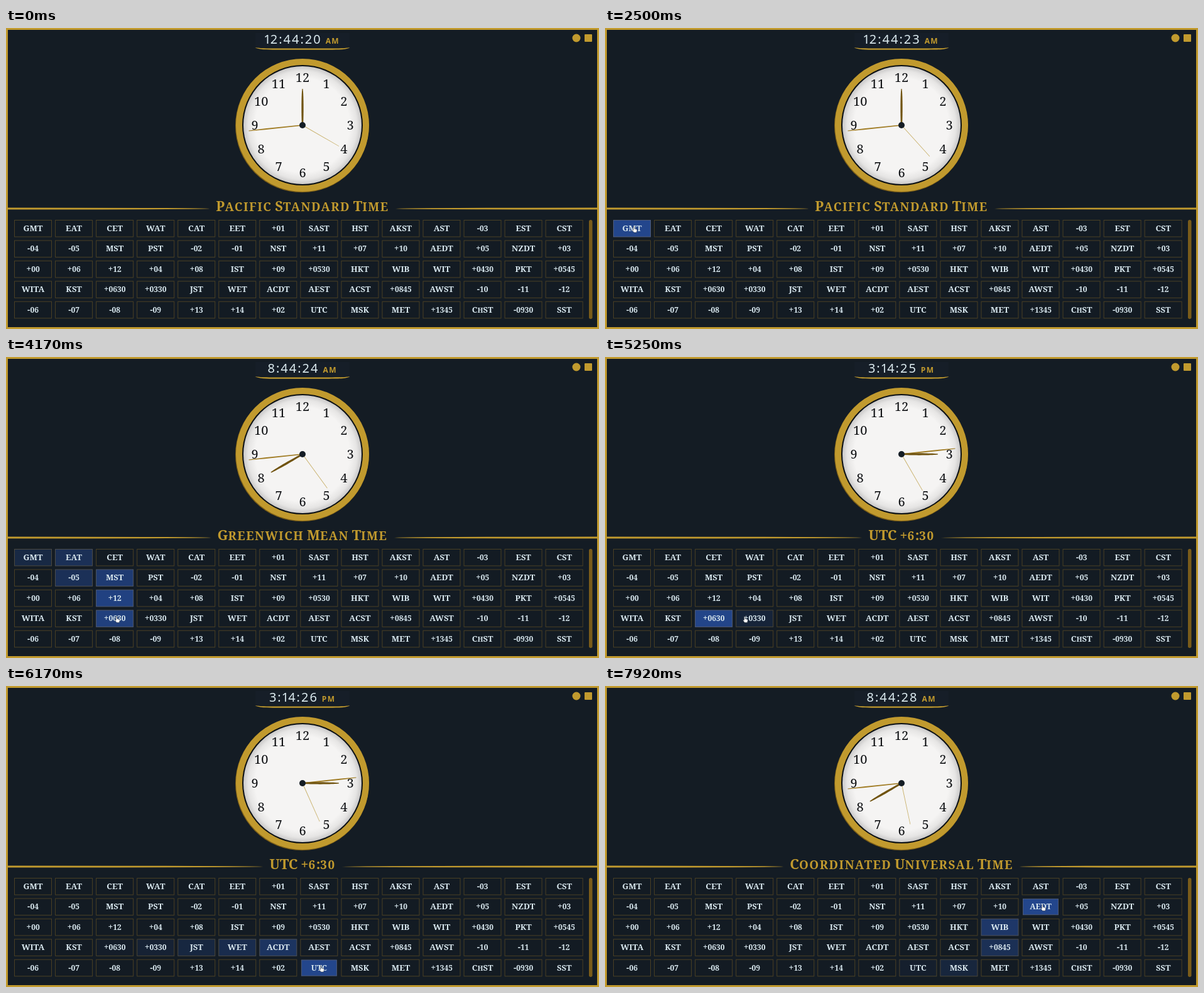
An HTML page that plays this animation: 944 by 480 pixels, repeating every 8 s.

```html
<!DOCTYPE html>
<html lang="en">
<head>
<meta charset="utf-8">
<title>World clock</title>
<style>
  html, body { margin: 0; width: 100%; height: 100%; overflow: hidden; background: #141c24; }
  svg { display: block; width: 100vw; height: 100vh; }
  text { text-anchor: middle; }
  .cells text { font: 700 13px "Noto Serif", serif; fill: #d9e8ef; }
  .cells text.num { font-size: 14px; }
  .dial text { font: 20px "Noto Serif", serif; fill: #0b0d10; }
  .title { font: 700 22px "Noto Serif", serif; fill: #c19a2e; word-spacing: -1px; }
  .title .small { letter-spacing: 1.5px; }
  .small { font-size: .86em; }
  .digital { font: 500 20px "Noto Sans", sans-serif; fill: #dcebf0; letter-spacing: 2px; }
  .digital .one { letter-spacing: -1px; }
  .digital .half { font-size: 12px; font-weight: 600; fill: #c19a2e; letter-spacing: 1.4px; }
</style>
</head>
<body>
<svg viewBox="0 0 944 480" xmlns="http://www.w3.org/2000/svg">
  <defs>
    <radialGradient id="face">
      <stop offset=".8" stop-color="#f5f4f3"/>
      <stop offset=".92" stop-color="#e6e5e4"/>
      <stop offset="1" stop-color="#c9c8c8"/>
    </radialGradient>
  </defs>
  <rect width="944" height="480" fill="#141c24"/>
  <rect x="397" y="8" width="150" height="23" fill="#161e28"/>
  <path fill="#c19a2e" d="M396.5 31C402 34.5 415 34.7 430 34.7H514C530 34.7 543 34.5 547.5 31C540 32.5 530 32.5 514 32.5H430C415 32.5 404 32.5 396.5 31Z"/>
  <text id="digital" class="digital" x="471.7" y="25"></text>
  <circle cx="908" cy="16" r="6.5" fill="#c19a2e"/>
  <rect x="921" y="10" width="12" height="12" rx="1" fill="#c19a2e"/>

  <g class="dial" transform="translate(472 155)">
    <circle cx="-.7" cy="1" r="106.3" fill="#7d5f18"/>
    <circle r="106" fill="#c19a2e"/>
    <circle r="96" fill="#0a0f14"/>
    <circle r="94" fill="url(#face)"/>
    <g id="hours"></g>
    <path id="second" d="M-.5 0L-.4-67H.4L.5 0Z" fill="#c8b06a"/>
    <path id="minute" d="M-.8 0L-1-60L-.4-86H.4L1-60L.8 0Z" fill="#a07c24"/>
    <path id="hour" d="M-1.1 0C-1.8-15-2-48-.5-58H.5C2-48 1.8-15 1.1 0Z" fill="#70530f"/>
    <circle r="5" fill="#141c24"/>
  </g>

  <path id="rule" fill="#c19a2e"/>
  <text id="title" class="title" x="472" y="292"></text>
  <g id="cells" class="cells"></g>
  <rect x="928" y="306" width="5.5" height="158" rx="2.7" fill="#7a5c1a"/>
  <rect x="1.5" y="1.5" width="941" height="477" fill="none" stroke="#c19a2e" stroke-width="3"/>
  <path id="cursor" fill="#fff" stroke="#1a222c" stroke-width=".6"/>
</svg>
<script>
const LOOP = 8000, FADE_IN = 100, FADE_OUT = 1000, PRESS = 120;
const COLS = 14, W = 60, H = 27.5;
const $ = id => document.getElementById(id);

const labels = `GMT EAT CET WAT CAT EET +01 SAST HST AKST AST -03 EST CST
-04 -05 MST PST -02 -01 NST +11 +07 +10 AEDT +05 NZDT +03
+00 +06 +12 +04 +08 IST +09 +0530 HKT WIB WIT +0430 PKT +0545
WITA KST +0630 +0330 JST WET ACDT AEST ACST +0845 AWST -10 -11 -12
-06 -07 -08 -09 +13 +14 +02 UTC MSK MET +1345 ChST -0930 SST`.split(/\s+/);

const cells = labels.map((label, i) => ({
  label, x: 13 + i % COLS * 65.05, y: 306 + Math.floor(i / COLS) * 32.45, spans: []
}));

// Zone chosen by each click, with its offset from UTC in hours
const zones = [
  { click: 0, name: 'Pacific Standard Time', offset: -8 },
  { click: 2900, name: 'Greenwich Mean Time', offset: 0 },
  { click: 4640, name: 'UTC +6:30', offset: 6.5 },
  { click: 6250, name: 'Coordinated Universal Time', offset: 0 }
];
const clicks = [...zones.map(z => z.click), LOOP];

// The pointer moves straight between these places.
const aim = label => {
  const c = cells.find(c => c.label === label);
  return { x: c.x + W / 2 + 3, y: c.y + H / 2 - 3 };
};
const route = [
  [500, { x: 946, y: 200 }], [1700, { x: 170, y: 290 }], [2100, { x: 50, y: 300 }],
  [2300, 'GMT'], [3400, 'GMT'], [3600, 'EAT'], [3700, '-05'], [3830, 'MST'], [4000, '+12'],
  [4120, '+0630'], [5180, '+0630'], [5280, '+0330'], [5640, 'ACDT'], [5900, 'UTC'],
  [6950, 'UTC'], [7100, 'MSK'], [7300, '+0845'], [7360, '+0845'], [7480, 'WIB'],
  [7520, 'WIB'], [7690, 'AEDT'], [LOOP, 'AEDT']
].map(([t, at]) => ({ t, ...(at.x ? at : aim(at)) }));

const HAND = 'M-1 0Q0-1 1 0V4L5 5Q6 5.5 6 7L5 11H0L-3 7Q-3 5.5-1 6.5Z';
const ARROW = 'M0 0V11L2.5 8.8L4.2 12.4L5.8 11.6L4.2 8.2H7.6Z';

const lerp = (a, b, k) => a + (b - a) * k;
const mix = (a, b, k) => `rgb(${a.map((v, i) => Math.round(lerp(v, b[i], k)))})`;

// Lower case becomes small capitals, figures take the same height.
const setType = s => s.replace(/[a-z0-9]+/g, c => `<tspan class="small">${c.toUpperCase()}</tspan>`);

function pointer(t) {
  const i = route.findIndex(p => p.t > t);
  if (i < 1) return null;
  const a = route[i - 1], b = route[i], k = (t - a.t) / (b.t - a.t);
  return { x: lerp(a.x, b.x, k), y: lerp(a.y, b.y, k) };
}

const hit = p => p && cells.find(c => p.x >= c.x && p.x <= c.x + W && p.y >= c.y && p.y <= c.y + H);

// Hover intervals follow from the route.
for (let t = 0, last; t < LOOP; t += 5) {
  const cell = hit(pointer(t));
  if (cell && cell !== last) cell.spans.push({ start: t, end: t });
  if (cell) cell.spans[cell.spans.length - 1].end = t + 5;
  last = cell;
}

function glow(cell, t) {
  return Math.max(0, ...cell.spans.filter(s => s.start <= t).map(s => {
    const peak = Math.min(1, (Math.min(t, s.end) - s.start) / FADE_IN);
    return peak * (1 - Math.max(0, t - s.end) / FADE_OUT);
  }));
}

$('cells').innerHTML = cells.map(c => `<g>
  <rect x="${c.x + .5}" y="${c.y + .5}" width="${W - 1}" height="${H - 1}"/>
  <text${/\d/.test(c.label) ? ' class="num"' : ''} x="${c.x + W / 2}" y="${c.y + 18}">${setType(c.label)}</text></g>`).join('');
[...$('cells').children].forEach((g, i) => {
  cells[i].group = g;
  cells[i].box = g.firstElementChild;
});

$('hours').innerHTML = Array.from({ length: 12 }, (_, i) => {
  const a = (i + 1) * Math.PI / 6;
  return `<text x="${76 * Math.sin(a)}" y="${7.2 - 76 * Math.cos(a)}">${i + 1}</text>`;
}).join('');

const turn = (id, deg) => $(id).setAttribute('transform', `rotate(${deg})`);
const shown = {};
function put(id, html) {
  if (shown[id] !== html) $(id).innerHTML = shown[id] = html;
}

function drawTime(t, offset) {
  const sec = 20 + Math.floor((t + 710) / 1000);
  const total = (24 + 8 + offset) * 60 + 44;
  const hour = Math.floor(total / 60) % 24, min = total % 60;
  const digits = `${hour % 12 || 12}:${min}:${sec}`.replace(/1/g, '<tspan class="one" dx="-1">1</tspan>');
  put('digital', `${digits}<tspan class="half" dx="6">${hour < 12 ? 'AM' : 'PM'}</tspan>`);
  turn('hour', hour * 30);
  turn('minute', min * 6);
  turn('second', sec * 6);
}

function drawTitle(name) {
  put('title', setType(name));
  const end = 472 - $('title').getComputedTextLength() / 2 - 10, bend = end * .95;
  const side = x => `M${x(3)} 286.5Q${x(bend)} 286.7 ${x(end)} 288Q${x(bend)} 289.3 ${x(3)} 289.5Z`;
  $('rule').setAttribute('d', side(x => x) + side(x => 944 - x));
}

function draw(t) {
  const zone = zones.filter(z => z.click <= t).pop();
  drawTime(t, zone.offset);
  drawTitle(zone.name);

  const p = pointer(t), over = hit(p);
  const pressed = clicks.some(c => t >= c - PRESS && t < c);
  for (const c of cells) {
    const k = glow(c, t), cx = c.x + W / 2, cy = c.y + H / 2;
    c.box.setAttribute('fill', mix([19, 27, 35], [35, 70, 140], k));
    c.box.setAttribute('stroke', mix([74, 64, 37], [80, 92, 120], k));
    c.group.setAttribute('transform', pressed && c === over
      ? `translate(${cx} ${cy}) scale(.95) translate(${-cx} ${-cy})` : '');
  }

  const cursor = $('cursor');
  cursor.style.display = p ? '' : 'none';
  if (p) {
    cursor.setAttribute('d', over ? HAND : ARROW);
    cursor.setAttribute('transform', `translate(${p.x} ${p.y}) scale(.85)`);
  }
}

const began = performance.now();
function frame() {
  draw((performance.now() - began) % LOOP);
  requestAnimationFrame(frame);
}
frame();
</script>
</body>
</html>
```
